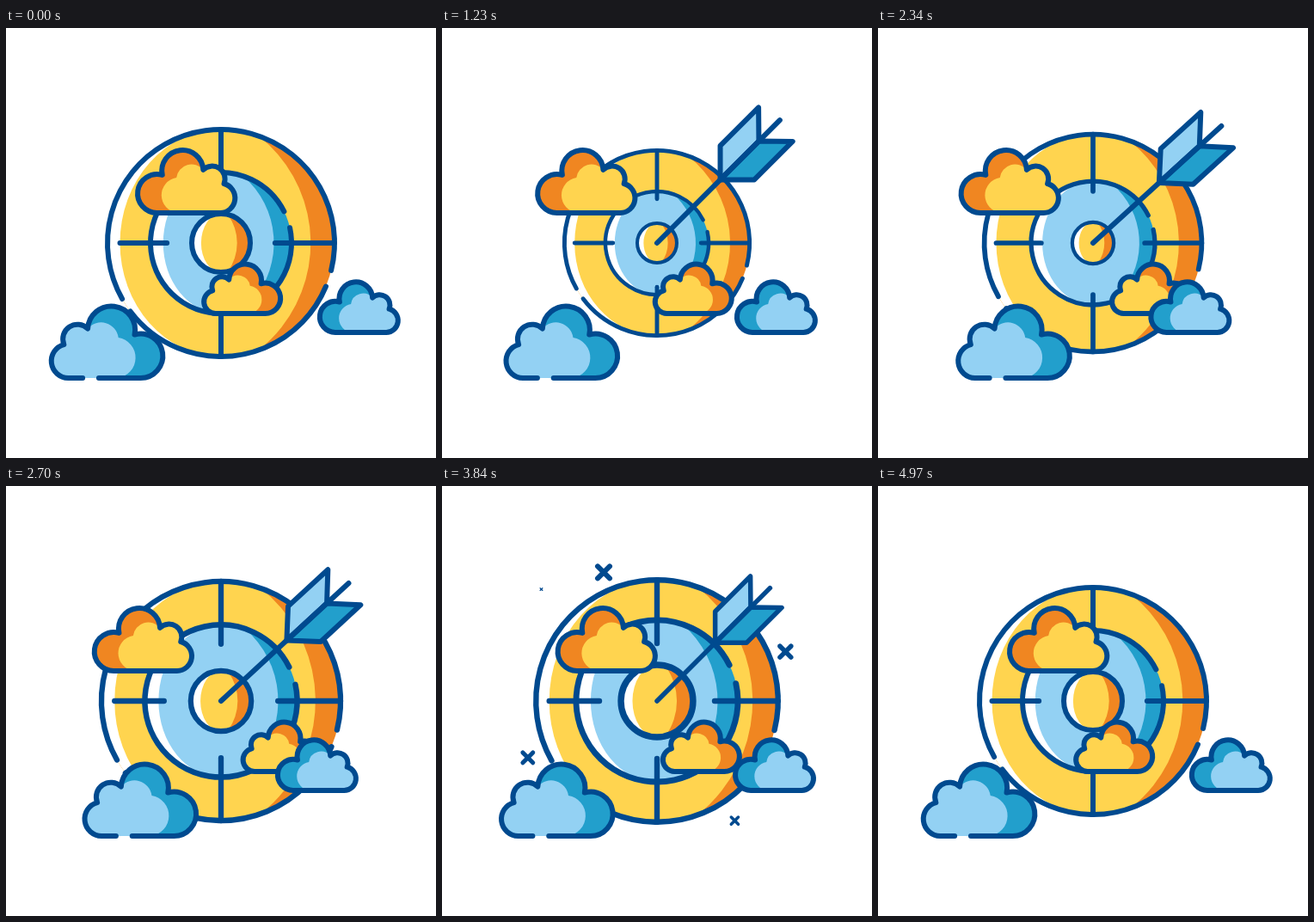
Animation of 500x500 px, one loop 5000 ms. Source, as an HTML page with a canvas:

```html
<!DOCTYPE html>
<html lang="en">
<head>
<meta charset="utf-8">
<title>Target</title>
<style>
  html, body { margin: 0; width: 100%; height: 100%; overflow: hidden; background: #fff; }
  canvas { display: block; }
</style>
</head>
<body>
<canvas width="500" height="500"></canvas>
<script>
const c = document.querySelector('canvas').getContext('2d');
const LOOP = 5000, TAU = Math.PI * 2, LINE = 6;
const NAVY = '#004a8f', YELLOW = '#ffd44f', ORANGE = '#f08621', SKY = '#93d1f3', BLUE = '#229fcc';
const rad = deg => deg * TAU / 360;

// Cosine ease from a to b between two moments
function ease(t, start, end, a = 0, b = 1) {
  const x = Math.min(1, Math.max(0, (t - start) / (end - start)));
  return a + (b - a) * (1 - Math.cos(Math.PI * x)) / 2;
}

const sway = (t, turn, from, to) =>
  t < turn ? ease(t, 0, turn, from, to) : ease(t, turn, LOOP, to, from);

function at(x, y, sx, sy, draw) {
  c.save();
  c.translate(x, y);
  c.scale(sx, sy);
  draw();
  c.restore();
}

function fill(color, path) {
  c.fillStyle = color;
  if (path) c.fill(path); else c.fill();
}

function line(...p) {
  c.beginPath();
  for (let i = 0; i < p.length; i += 2) c.lineTo(p[i], p[i + 1]);
}

function strokeArc(from, to) {
  c.beginPath();
  c.arc(0, 0, 100, rad(from), rad(to));
  c.stroke();
}

// Each inner disc pulses later and more strongly than the one around it
function pulse(t, i) {
  const low = 0.8 - 0.13 * i, high = 1.106 + 0.117 * i;
  const lowTime = 1500 + 220 * i, highTime = 3150 + 55 * i;
  if (t < lowTime) return ease(t, 0, lowTime, 1, low);
  if (t < highTime) return ease(t, lowTime, highTime, low, high);
  return ease(t, highTime, 4800, high, 1);
}

// Draws in units where the disc's radius is 100
function scaled(t, i, radius, draw) {
  const s = radius * pulse(t, i) / 100;
  at(250, 250, s, s, () => {
    c.lineWidth = LINE * 100 / radius;
    draw();
  });
}

// White sliver up to -left, shade from right on
function discFill(left, right, light, shade) {
  const meet = 0.42 * right, h = Math.sqrt(1e4 - meet * meet);
  const cx = (right * right - 1e4) / (2 * (right - meet));
  const phi = Math.atan2(h, meet - cx), edge = Math.atan2(h, meet);
  c.beginPath();
  c.arc(0, 0, 100, 0, TAU);
  fill(shade);
  c.beginPath();
  c.arc(cx, 0, right - cx, -phi, phi);
  c.arc(0, 0, 100, edge, TAU - edge);
  fill(light);
  c.beginPath();
  c.ellipse(0, 0, left, 100, 0, -TAU / 4, TAU / 4, true);
  c.arc(0, 0, 100, TAU / 4, TAU * 3 / 4);
  fill('#fff');
}

function crosshair() {
  for (let i = 0; i < 4; i++) {
    line(47.6, 0, i === 2 ? 89 : 100, 0);
    c.stroke();
    c.rotate(TAU / 4);
  }
}

function target(t) {
  scaled(t, 0, 132, () => {
    discFill(89, 79, YELLOW, ORANGE);
    strokeArc(22.5, 143);
    strokeArc(150.5, 374);
  });
  scaled(t, 1, 82, () => {
    discFill(82, 75, SKY, BLUE);
    strokeArc(-12.5, 333.5);
  });
  scaled(t, 0, 132, crosshair);
  scaled(t, 2, 34, () => {
    discFill(68, 55, YELLOW, ORANGE);
    strokeArc(0, 360);
  });
}

const HUMPS = 'M37 0H20A20 20 0 0 1 15-39.3A17.2 17.2 0 0 1 43-58';
const OUTLINE = HUMPS + 'A27.8 27.8 0 1 1 98-51A26 26 0 1 1 105 0H56';
const openCloud = new Path2D(OUTLINE);
const closedCloud = new Path2D(OUTLINE + 'Z');
const cloudLight = new Path2D(HUMPS + 'A20.5 20.5 0 0 1 79-47.5A24 24 0 0 1 78 0Z');

// (x, y) is the lower left corner, or lower right when flipped
function cloud(x, y, size, flip, light, shade, path = closedCloud) {
  at(x, y, flip ? -size : size, size, () => {
    fill(shade, path);
    fill(light, cloudLight);
    c.lineWidth = LINE / size;
    c.stroke(path);
  });
}

// Pops up in the corner, flies to the bull, quivers, then shrinks away
function arrow(t) {
  const peak = 1.09, shown = 630, hit = 1160;
  const grown = ease(t, 0, shown, 0, peak);
  const s = grown - ease(t, shown, hit, 0, peak - 1) - ease(t, 3660, 4650);
  if (s < 0.005) return;
  const fly = ease(t, shown, hit);
  const startX = 402 - 79 * grown, startY = 104 + 78.5 * grown;
  const quiver = t > 2230 && t < 3360 ? 4.6 * Math.sin(TAU * (t - 2230) / 1130) : 0;
  at(startX + (250 - startX) * fly, startY + (250 - startY) * fly, s, s, () => {
    c.rotate(rad(quiver - 45));
    c.lineWidth = LINE;
    for (const side of [-1, 1]) {
      line(104, 0, 132, 28 * side, 195, 28 * side, 167.5, 0);
      c.closePath();
      fill(side < 0 ? SKY : BLUE);
      c.stroke();
    }
    line(0, 0, 202, 0);
    c.stroke();
  });
}

// Angle and distance from the bull, moment of full size
const SPARKS = [[-136, 187, 1980], [-112.5, 162, 1720], [-21, 160, 1640], [156.3, 164, 1810], [57, 166, 1880]];

function spark(t, [angle, far, peak]) {
  // Every spark shows twice
  for (const p of [peak, peak + 2130]) {
    const s = ease(Math.abs(t - p), 0, 380, 1, 0);
    if (s < 0.01) continue;
    at(250 + far * Math.cos(rad(angle)), 250 + far * Math.sin(rad(angle)), s, s, () => {
      c.lineWidth = LINE;
      for (const d of [-7, 7]) {
        line(-7, -d, 7, d);
        c.stroke();
      }
    });
  }
}

function frame() {
  const t = performance.now() % LOOP;
  c.fillStyle = '#fff';
  c.fillRect(0, 0, 500, 500);
  c.strokeStyle = NAVY;
  c.lineCap = c.lineJoin = 'round';
  target(t);
  cloud(sway(t, 1930, 266.5, 207.5), 215, 0.865, true, YELLOW, ORANGE);
  cloud(sway(t, 2900, 230, 276), 332, 0.68, false, YELLOW, ORANGE);
  cloud(sway(t, 2640, 456, 407), 354, 0.695, true, SKY, BLUE);
  cloud(sway(t, 2350, 52.5, 93), 407, 0.99, false, SKY, BLUE, openCloud);
  arrow(t);
  SPARKS.forEach(s => spark(t, s));
  requestAnimationFrame(frame);
}
frame();
</script>
</body>
</html>
```
